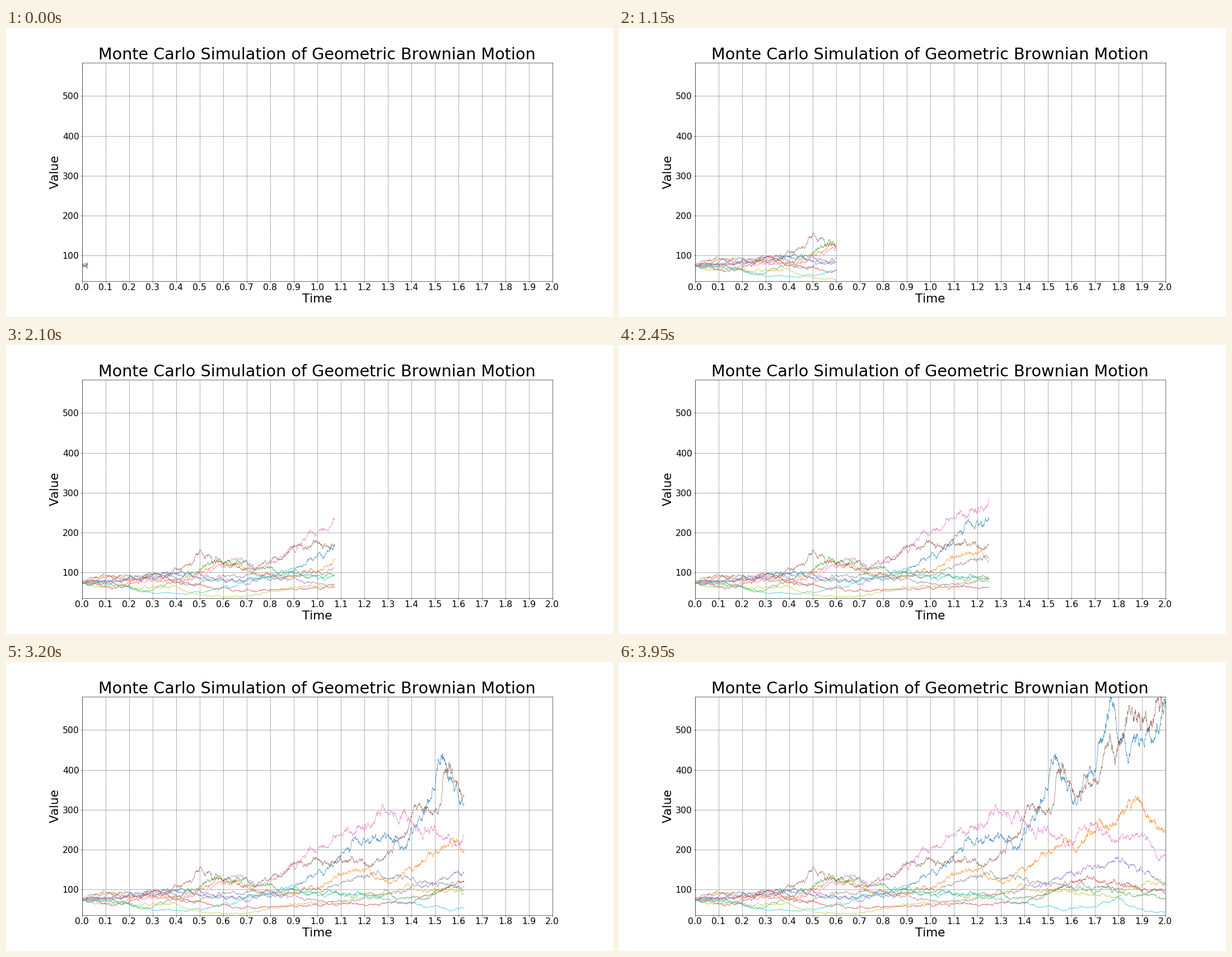
Recreate the animation shown at these times as a matplotlib script. Size 1084 px wide and 516 px high, loop 4000 ms.

```python
import numpy as np
import matplotlib.pyplot as plt
from matplotlib.animation import FuncAnimation

W, H, DPI = 1084, 516, 64
FRAMES, INTERVAL = 80, 50
T_END, STEPS, START = 2.0, 2000, 75
LOW, HIGH = 36.8, 583.4
SIGMA, MEMORY = 0.4, 0.025

plt.rcParams["font.family"] = "DejaVu Sans"
plt.rcParams["text.kerning_factor"] = 6


def pt(px):
    """Pixels to points."""
    return px * 72 / DPI


time = np.linspace(0, T_END, STEPS + 1)
rng = np.random.default_rng(7)
paths = []


def random_path(turns):
    """Exponential growth between turning points, with short-memory noise."""
    t, v = zip((0, START), *turns)
    trend = np.interp(time, t, np.log(v))
    dt = T_END / STEPS
    steps = rng.normal(0, SIGMA * np.sqrt(dt), STEPS)
    noise = np.convolve(steps, np.exp(-time / MEMORY))[:STEPS]
    value = np.exp(trend + np.append(0, noise))
    # fold back at the axis limits
    value = HIGH - np.abs(HIGH - value)
    return LOW + np.abs(value - LOW)


fig = plt.figure(figsize=(W / DPI, H / DPI), dpi=DPI, facecolor="white")
ax = fig.add_axes([0.125, 0.125, 0.775, 0.755])
ax.set_xlim(0, T_END)
ax.set_ylim(LOW, HIGH)
ax.set_xticks(np.arange(21) / 10)
ax.xaxis.set_major_formatter("{x:.1f}")
ax.set_yticks(range(100, 600, 100))
ax.tick_params(labelsize=pt(15.77), length=pt(2.5), width=pt(0.57), pad=pt(2.5))
ax.grid(color="0.2", linestyle=(0, (3.5, 1.75)), linewidth=pt(0.57))
for spine in ax.spines.values():
    spine.set_linewidth(pt(0.57))
ax.set_title("Monte Carlo Simulation of Geometric Brownian Motion",
             fontsize=pt(28.67), pad=pt(5))
ax.set_xlabel("Time", fontsize=pt(21.5), labelpad=pt(2.9))
ax.set_ylabel("Value", fontsize=pt(21.5), labelpad=pt(2.9))


def add_path(color, *turns):
    line, = ax.plot([], [], color=color, linewidth=pt(0.6))
    paths.append((line, random_path(turns)))


add_path("tab:blue", (0.44, 104), (0.65, 77), (0.87, 92), (1.17, 232),
         (1.37, 212), (1.53, 405), (1.61, 325), (1.77, 570), (1.84, 445),
         (1.94, 455), (2, 575))
add_path("tab:orange", (0.07, 88), (0.43, 80), (0.57, 122), (0.87, 88),
         (1.15, 143), (1.31, 120), (1.57, 235), (1.61, 208), (1.87, 322),
         (2, 240))
add_path("tab:green", (0.28, 58), (0.57, 136), (0.75, 120), (0.85, 95),
         (1.45, 80), (1.58, 108), (2, 80))
add_path("tab:red", (0.13, 60), (0.31, 104), (0.42, 75), (0.68, 55),
         (1.4, 72), (1.62, 125), (1.8, 118), (2, 85))
add_path("tab:purple", (0.5, 98), (0.7, 76), (0.8, 100), (1, 73),
         (1.15, 73), (1.8, 172), (2, 122))
add_path("tab:brown", (0.35, 90), (0.5, 140), (0.72, 106), (0.9, 160),
         (1.16, 185), (1.25, 153), (1.43, 315), (1.5, 295), (1.56, 395),
         (1.64, 350), (1.85, 545), (2, 540))
add_path("tab:pink", (0.45, 82), (0.65, 130), (0.78, 103), (0.95, 198),
         (1.28, 295), (1.38, 278), (1.6, 212), (1.68, 262), (1.77, 222),
         (1.86, 252), (1.97, 188))
add_path("tab:gray", (0.06, 90), (0.35, 94), (0.45, 70), (0.6, 95),
         (0.9, 90), (1.27, 138), (1.6, 105), (2, 103))
add_path("tab:olive", (0.15, 66), (0.4, 60), (0.47, 46), (0.68, 39),
         (0.8, 52), (1.4, 101), (1.6, 98), (1.77, 80), (1.9, 118))
add_path("tab:cyan", (0.2, 68), (0.27, 51), (0.45, 47), (0.85, 102),
         (1.23, 85), (1.57, 48), (1.8, 76), (1.95, 43))


def draw(frame):
    n = (frame + 1) * STEPS // FRAMES + 1
    for line, value in paths:
        line.set_data(time[:n], value[:n])
    return [line for line, _ in paths]


anim = FuncAnimation(fig, draw, frames=FRAMES, interval=INTERVAL,
                     repeat=True, repeat_delay=0, blit=False)
plt.show()
```
